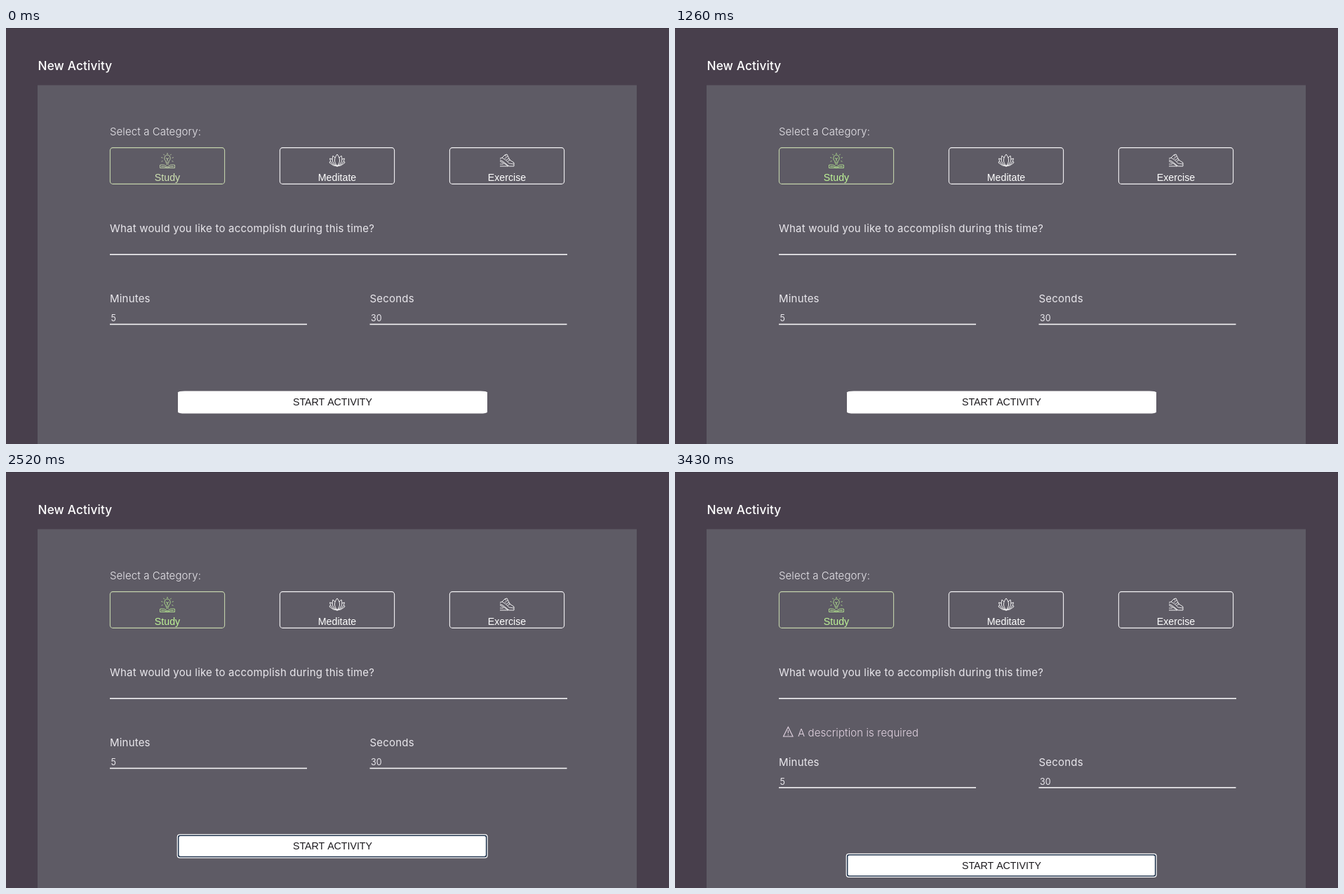
Write an HTML page with a canvas that moves like this. It is 945x593 px and loops after 3500 ms.

```html
<!DOCTYPE html>
<html lang="en">
<head>
<meta charset="utf-8">
<title>New Activity</title>
<style>
html, body { margin: 0; width: 100%; height: 100%; overflow: hidden; background: #483f4c; }
canvas { display: block; }
</style>
</head>
<body>
<canvas id="stage" width="945" height="593"></canvas>
<script>
const ctx = document.getElementById('stage').getContext('2d');
const LOOP = 3500, FOCUS = 2520, ERROR = 2590, SHIFT = 27.5;
const SANS = 'Inter, "Open Sans", sans-serif';
const ARIAL = '"Liberation Sans", Arial, sans-serif';
const LIGHT = '#e9e7ec';

function text(str, x, y, font, color, spacing = 0, align = 'left') {
  ctx.font = font;
  ctx.letterSpacing = spacing + 'px';
  ctx.textAlign = align;
  ctx.fillStyle = color;
  ctx.fillText(str, x, y);
}

function label(str, x, y) {
  text(str, x, y, '400 15px ' + SANS, LIGHT, 0.2);
}

function thinLabel(str, x, y, color = LIGHT) {
  text(str, x, y, '300 15px ' + SANS, color, 0.1);
}

function rect(x, y, w, h, color) {
  ctx.fillStyle = color;
  ctx.fillRect(x, y, w, h);
}

function box(x, y, w, h, r) {
  ctx.beginPath();
  ctx.roundRect(x, y, w, h, r);
}

function fillBox(x, y, w, h, r, color) {
  box(x, y, w, h, r);
  ctx.fillStyle = color;
  ctx.fill();
}

function stroke(d, color, width = 1) {
  ctx.strokeStyle = color;
  ctx.lineWidth = width;
  ctx.stroke(new Path2D(d));
}

// Icons are drawn around the point (0, 0), about 22 px wide.
function bulb(color) {
  stroke('M-2 3V1C-6-2-4-8 0-8S6-2 2 1V3ZM-2 5H2M0 1V-3M-2-4L0-2L2-4', color, 0.8);
  for (let i = 0; i < 7; i++) {
    const a = Math.PI * (0.88 + i * 0.207), c = Math.cos(a), s = Math.sin(a);
    stroke(`M${c * 7} ${s * 7 - 2}L${c * 9} ${s * 9 - 2}`, color, 0.8);
  }
  stroke('M-10.5 6V10.5H10.5V6M-10 6Q-4 5 0 9Q4 5 10 6M-9 8.5Q-4 7.5 0 10.5Q4 7.5 9 8.5', color, 0.8);
}

function lotus(color) {
  stroke('M0-9Q-5-3-3 3L0 8L3 3Q5-3 0-9ZM-3-4L-6-7Q-8 0-5 4L0 8L5 4Q8 0 6-7L3-4', color, 0.9);
  stroke('M-7-2L-10.5-3Q-9 6 0 8Q9 6 10.5-3L7-2M-10 1L-11 3Q-6 8 0 8Q6 8 11 3L10 1', color, 0.9);
}

function shoe(color) {
  stroke('M-10-3L-7-4L-3-8L0-9L2-5L4-1L10 3V8H3L-6 1L-10-1M-10 1L-4 4L2 8H-10', color, 0.9);
  stroke('M-7-4L-2-1L3 4L10 5M-3-3L1-6M-1-1L3-3M1 1L5-1M-3-8L-1-6M-10 5H-5', color, 0.8);
}

function category(name, icon, x, color, border) {
  box(x + 0.4, 170.6, 163.2, 51.8, 4);
  ctx.strokeStyle = border;
  ctx.lineWidth = 1.1;
  ctx.stroke();
  ctx.save();
  ctx.translate(x + 82, 189);
  ctx.lineJoin = 'round';
  icon(color);
  ctx.restore();
  text(name, x + 82, 217.5, '14.2px ' + ARIAL, color, 0, 'center');
}

function field(name, value, x, dy) {
  label(name, x, 391 + dy);
  text(value, x + 1.5, 418 + dy, '400 12.5px ' + SANS, LIGHT);
  rect(x, 421.6 + dy, 281, 1.6, '#f4f3f5');
}

function startButton(dy, focused) {
  const y = 517.5 + dy;
  if (focused) {
    fillBox(243.7, y - 1.2, 443, 34.2, 4, '#fff');
    fillBox(244.9, y, 440.6, 31.8, 3, '#23364f');
    fillBox(246.5, y + 1.6, 437.4, 28.6, 2, '#fff');
  } else {
    fillBox(245, y, 441, 32, { x: 10, y: 2 }, '#fff');
  }
  text('START ACTIVITY', 465.5, 538 + dy, '14.2px ' + ARIAL, '#1b191d', 0, 'center');
}

function warning() {
  const pale = '#e2d3e1';
  stroke('M161.3 363.5L168 377H154.5ZM161.3 368V372.5M161.3 374V375.2', pale, 1.1);
  thinLabel('A description is required', 175, 377, pale);
}

function draw(t) {
  const failed = t >= ERROR, dy = failed ? SHIFT : 0;
  const k = Math.min(1, Math.floor(t / 70) / 3);
  const mix = (a, b) => Math.round(a + (b - a) * k);
  const green = `rgb(${mix(207, 190)},${mix(226, 244)},${mix(178, 150)})`;

  rect(0, 0, 945, 593, '#483f4c');
  rect(0, 0, 945, 1, '#3d3643');
  rect(45, 81.5, 854, 511.5, '#5e5b65');
  text('New Activity', 45.5, 60, '500 17.2px ' + SANS, '#fff', 0.15);

  thinLabel('Select a Category:', 148, 152.5);
  category('Study', bulb, 148, green, '#c3d2ab');
  category('Meditate', lotus, 390, '#fff', '#f2f1f3');
  category('Exercise', shoe, 632, '#fff', '#f2f1f3');

  label('What would you like to accomplish during this time?', 148, 291);
  rect(148, 322, 652, 1.6, '#f4f3f5');
  if (failed) warning();
  field('Minutes', '5', 148, dy);
  field('Seconds', '30', 518.5, dy);
  startButton(dy, t >= FOCUS);
}

const start = performance.now();
function tick() {
  draw((performance.now() - start) % LOOP);
  requestAnimationFrame(tick);
}
tick();
</script>
</body>
</html>
```
